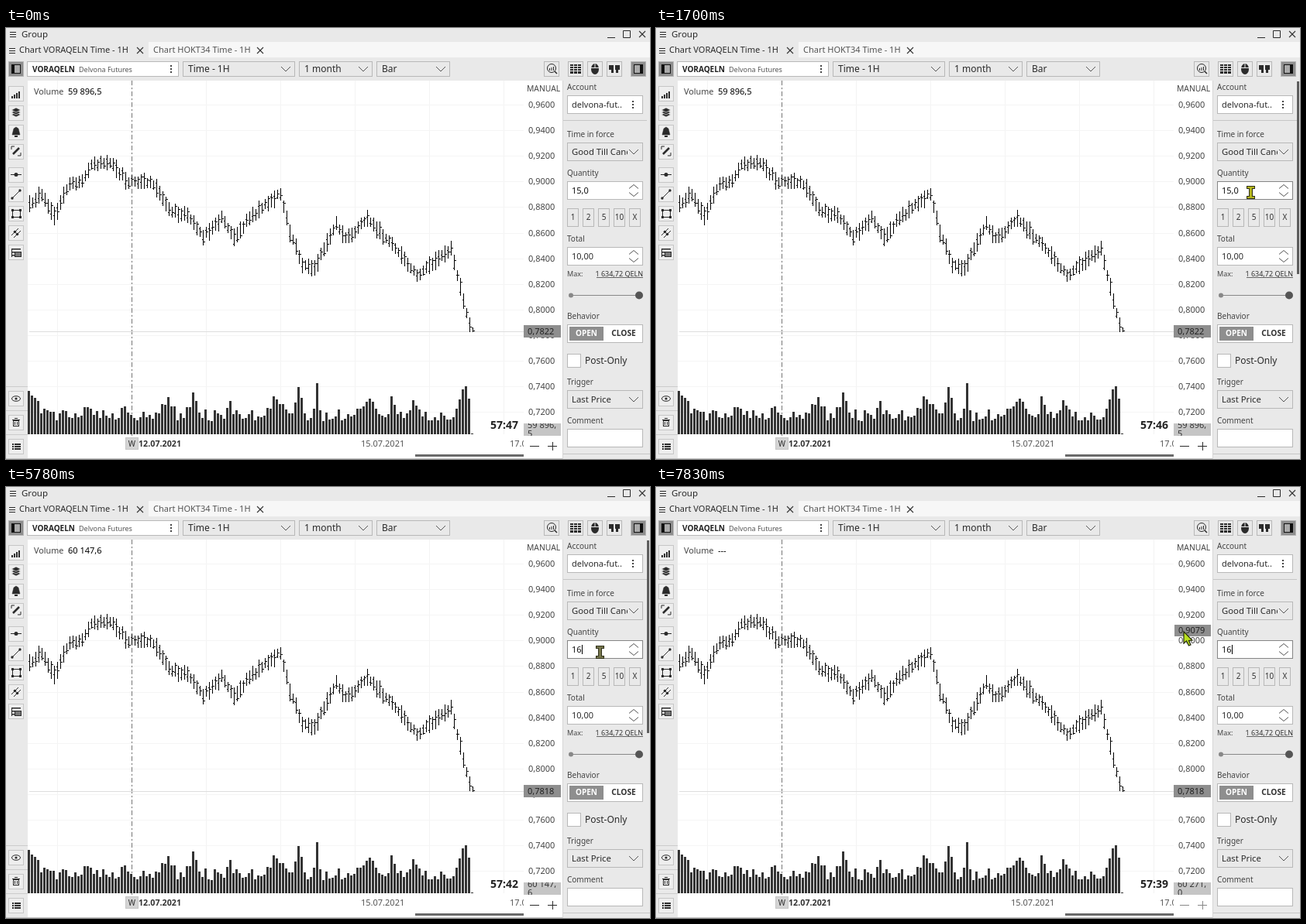
Recreate the animation shown at these times as an HTML page with a canvas. Size 831 px wide and 557 px high, loop 8 s.

```html
<!DOCTYPE html>
<html lang="en">
<head>
<meta charset="utf-8">
<title>Trading chart</title>
<style>
html, body { margin: 0; width: 100%; height: 100%; overflow: hidden; background: #e9e9e9; }
canvas { display: block; width: 831px; height: 557px; }
</style>
</head>
<body>
<canvas id="stage" width="831" height="557"></canvas>
<script>
const LOOP = 8000;
const c = document.getElementById('stage').getContext('2d');
const PANEL = '#e9e9e9', EDGE = '#b8b8b8', INK = '#2b2b2b', MID = '#8e8e8e';
const FONT = '"Noto Sans", "Open Sans", sans-serif';

// Drawing helpers
function rect(x, y, w, h, color = INK) {
  c.fillStyle = color;
  c.fillRect(x, y, w, h);
}
function box(x, y, w, h, fill, edge = EDGE) {
  rect(x, y, w, h, edge);
  rect(x + 1, y + 1, w - 2, h - 2, fill);
}
function text(s, x, y, size = 11, color = INK, weight = 400, align = 'left') {
  c.font = `${weight} ${size}px ${FONT}`;
  c.fillStyle = color;
  c.textAlign = align;
  c.fillText(s, x, y);
}
function path(points, color = INK, width = 1, fill) {
  c.beginPath();
  points.forEach(([x, y]) => c.lineTo(x, y));
  if (fill) {
    c.closePath();
    c.fillStyle = fill;
    c.fill();
  }
  c.strokeStyle = color;
  c.lineWidth = width;
  c.stroke();
}
function oval(x, y, rx, ry = rx, fill = INK) {
  c.beginPath();
  c.ellipse(x, y, rx, ry, 0, 0, 7);
  if (fill) {
    c.fillStyle = fill;
    c.fill();
  } else {
    c.strokeStyle = INK;
    c.lineWidth = 1;
    c.stroke();
  }
}
function clipped(x, y, w, h, draw) {
  c.save();
  c.beginPath();
  c.rect(x, y, w, h);
  c.clip();
  draw();
  c.restore();
}
function repeat(n, draw) {
  for (let i = 0; i < n; i++) draw(i);
}
const chevron = (x, y, d) => path([[x - 6, y - d], [x, y + d], [x + 6, y - d]], '#555');
const cross = (x, y) => {
  path([[x - 4, y - 4], [x + 4, y + 4]], '#333', 1.1);
  path([[x - 4, y + 4], [x + 4, y - 4]], '#333', 1.1);
};
const burger = (x, y) => repeat(3, i => rect(x, y - 3 + i * 3, 8, 1));
const dots = (x, y) => repeat(3, i => rect(x - 1, y - 5 + i * 4, 2, 2, '#444'));

function rng(seed) {
  return () => (seed = seed * 16807 % 2147483647) / 2147483647;
}

// Turning points of the price line: x, y
const turns = [[30, 229], [46, 214], [62, 243], [82, 201], [98, 199], [110, 177], [134, 174],
  [158, 199], [186, 198], [214, 238], [234, 240], [254, 271], [278, 246], [294, 272],
  [312, 247], [354, 214], [366, 264], [382, 305], [398, 310], [426, 254], [440, 273],
  [466, 246], [498, 281], [530, 320], [574, 286], [598, 386]];
// Busy spells: x, extra volume, spread
const busy = [[30, 35, 14], [106, 16, 8], [154, 18, 6], [208, 22, 8], [242, 34, 6],
  [290, 30, 4], [350, 34, 8], [378, 40, 5], [402, 45, 3], [470, 30, 10], [500, 26, 5],
  [528, 26, 5], [592, 48, 7]];

function along(points, x) {
  const i = Math.max(1, points.findIndex(p => p[0] >= x));
  const a = points[i - 1], b = points[i], u = (x - a[0]) / (b[0] - a[0]);
  return a.slice(1).map((v, k) => v + (b[k + 1] - v) * u);
}

function makeBars() {
  const rand = rng(4127), bars = [];
  for (let x = 30; x <= 598; x += 4) {
    const mid = along(turns, x)[0] + (rand() - .5) * 5;
    const half = 6 + 6 * rand();
    const spot = () => Math.round(mid + (rand() - .5) * half * 1.4);
    const extra = busy.reduce((m, [at, h, w]) =>
      Math.max(m, h * Math.exp(-(((x - at) / w) ** 2))), 0);
    bars.push({
      x, hi: Math.round(mid - half), lo: Math.round(mid + half),
      open: spot(), close: spot(),
      vol: Math.round(17 + 15 * rand() + extra * .8)
    });
  }
  return bars;
}
const bars = makeBars();

// Timeline
const clock = t => 47 - Math.floor(t / 970);
const price = t => t < 3910 ? '0,7822' : t < 4430 ? '0,7819' : '0,7818';
const volume = t => t < 3910 ? '59 896,5' : t < 7230 ? '60 147,6' : '60 271,0';
const quantity = t => t < 3960 ? '15,0' : t < 4700 ? '1' : '16';
function caretOn(t) {
  const since = [7430, 4700, 3960].find(at => t >= at);
  return since && Math.floor((t - since) / 540) % 2 === 0;
}

// Pointer: time, x, y
const track = [[660, 822, 524], [1140, 749, 247], [1700, 767, 212], [7440, 766, 213],
  [7830, 681, 187], [LOOP, 681, 187]];
function pointer(t) {
  if (t < track[0][0]) return null;
  const [x, y] = along(track, t);
  return { x, y };
}
const over = (p, y) => p && p.x >= 724 && p.x < 822 && p.y >= y && p.y < y + 25;

function header() {
  rect(0, 0, 831, 557, PANEL);
  rect(184, 18, 647, 20, '#f7f7f7');
  burger(5, 8);
  text('Group', 20, 12, 11.5);
  rect(776, 12, 10, 1);
  path([[796.5, 3.5], [805.5, 3.5], [805.5, 12.5], [796.5, 12.5]], INK, 1, PANEL);
  cross(821, 8);
  burger(4, 29);
  text('Chart VORAQELN Time - 1H', 17, 32);
  cross(173, 29);
  text('Chart HOKT34 Time - 1H', 190, 32, 11, '#555');
  cross(328, 29);

  box(27, 43, 196, 20, '#fff');
  text('VORAQELN', 34, 57, 10, '#222', 700);
  text('Delvona Futures', 94, 57, 9, '#555');
  dots(213, 53);
  [[228, 145, 'Time - 1H'], [378, 95, '1 month'], [478, 95, 'Bar']].forEach(([x, w, s]) => {
    box(x, 43, w, 20, PANEL);
    text(s, x + 7, 57, 12);
    chevron(x + w - 12, 53, 3);
  });

  [3, 694, 725, 750, 775, 806].forEach(x => box(x, 43, 20, 20, x === 3 || x === 806 ? MID : PANEL));
  [[7, 0], [810, 8]].forEach(([x, side]) => {
    box(x, 47, 12, 12, '#aaa', '#111');
    rect(x + side, 47, 4, 12, '#111');
  });
  oval(704, 52, 5.5, 5.5, null);
  repeat(3, i => rect(701 + i * 2.5, 52 - i, 1, 3 + i));
  path([[708, 56], [711, 59]], INK, 1.5);
  rect(728, 47, 14, 12);
  repeat(3, i => rect(728, 49 + i * 3, 14, 1, PANEL));
  repeat(2, i => rect(732 + i * 5, 47, 1, 12, PANEL));
  oval(760, 53, 5, 7);
  rect(755, 51, 10, 1, PANEL);
  rect(759.5, 46, 1, 5, PANEL);
  repeat(2, i => {
    rect(778 + i * 8, 48, 6, 6);
    rect(781 + i * 6, 54, 3, 4);
  });
}

function tools() {
  const button = y => box(3, y, 20, 20, '#eeeeee', '#c6c6c6');
  repeat(4, i => button(75 + i * 25));
  repeat(5, i => button(180 + i * 25));
  repeat(3, i => {
    button(469 + i * 31);
    rect(0, 463 + i * 31, 28, 1, '#cccccc');
  });
  // Bars, layers, bell, pencil
  repeat(4, i => rect(7 + i * 3, 88 - i * 2, 2, 3 + i * 2));
  repeat(3, i => {
    const y = 112 - i * 3;
    path([[7, y], [13, y - 3], [19, y], [13, y + 3]], '#eee', .7, INK);
  });
  path([[8, 138], [10, 130], [13, 128], [16, 130], [18, 138]], INK, .5, INK);
  rect(11, 139, 4, 2);
  path([[9, 163], [17, 155]], INK, 2.5);
  path([[7, 157], [7, 153], [11, 153]]);
  path([[19, 161], [19, 165], [15, 165]]);
  // Level, line, rectangle, channel, notes
  rect(6, 189, 14, 1);
  oval(13, 189.5, 2.5);
  path([[8, 220], [18, 210]]);
  [-5, 5].forEach(d => oval(13 + d, 215 - d, 1.7));
  box(8, 235, 11, 10, '#eee', INK);
  [8, 18].forEach(x => [235, 244].forEach(y => rect(x - 1, y - 1, 3, 3)));
  [0, 3].forEach(d => {
    path([[7 + d, 268 + d], [16 + d, 259 + d]]);
    oval(11.5 + d, 263.5 + d, 1.8);
  });
  repeat(3, i => rect(7, 285 + i * 4, 12, 1.5));
  rect(7, 285, 1, 11);
  box(11, 289, 9, 7, '#777', INK);
  // Eye, bin, list
  oval(13, 479, 5.5, 3.3, null);
  oval(13, 479, 1.6);
  box(9, 507, 8, 8, '#eee', INK);
  rect(8, 506, 10, 1);
  rect(11, 504, 4, 1);
  repeat(2, i => rect(11 + i * 3, 509, 1, 4));
  repeat(3, i => {
    rect(8, 537 + i * 3, 2, 2);
    rect(11, 537 + i * 3, 8, 2);
  });
}

function bar(x, hi, lo, open, close) {
  rect(x, hi, 1, lo - hi, '#000');
  rect(x - 1, open, 1, 1, '#000');
  rect(x + 1, close, 2, 1, '#000');
}

function chart(t) {
  rect(28, 68, 690, 488, '#fff');
  repeat(7, i => rect(66 + i * 96, 68, 1, 457, '#f3f3f3'));
  repeat(13, i => {
    const y = Math.round(99 + i * 33.1);
    rect(28, y, 640, 1, '#f5f5f5');
    text('0,' + (9600 - i * 200), 674, y + 4, 11, '#444');
  });
  c.setLineDash([6, 3, 2, 3]);
  path([[162.5, 68], [162.5, 528]], '#777');
  c.setLineDash([]);

  const py = t < 3910 ? 392 : 393;
  rect(30, py, 638, 1, '#dedede');
  for (const b of bars) {
    bar(b.x, b.hi, b.lo, b.open, b.close);
    rect(b.x - 2, 525 - b.vol, 3, b.vol, '#333');
  }
  bar(602, 387, py + 1, 387, py - 1);
  rect(600, 524, 3, 1, '#333');

  const outside = t >= 7640;
  text('MANUAL', 672, 82, 10.3, '#444');
  text('Volume', 36, 86, 10.8, '#444');
  text(outside ? '---' : volume(t), 80, 86, 11, '#000');
  text('57:' + clock(t), 625, 518, 14, '#222', 700);

  rect(668, py - 8, 48, 16, MID);
  text(price(t), 673, py + 4, 11, '#222');
  clipped(668, 511, 48, 16, () => {
    const v = volume(t);
    rect(668, 511, 48, 16, '#c5c5c5');
    text(v.slice(0, -1), 673, 517, 11, '#333');
    text(v.slice(-1), 673, 528, 11, '#333');
  });
  if (outside) {
    const y = Math.round(pointer(t).y) - 2;
    rect(669, y - 7, 47, 15, MID);
    text('0,9079', 674, y + 4, 11, '#222');
  }

  box(154, 529, 17, 16, '#d4d4d4', '#c6c6c6');
  text('W', 162.5, 541, 10, INK, 400, 'center');
  text('12.07.2021', 171, 541, 10.7, '#333', 700);
  text('15.07.2021', 458, 541, 11, '#555');
  clipped(640, 530, 28, 16, () => text('17.07.2021', 650, 541, 11, '#555'));
  const zoom = outside ? '#888' : INK;
  rect(676, 540, 12, 1, zoom);
  rect(699, 540, 12, 1, zoom);
  rect(705, 535, 1, 11, zoom);
  rect(528, 551, 140, 3, '#6a6a6a');
  rect(0, 556, 718, 1, '#c4c4c4');
}

function field(y, s, hot) {
  box(724, y, 98, 24, '#fff', hot ? '#858585' : EDGE);
  text(s, 730, y + 16);
}
function spinner(y) {
  chevron(810, y + 7, -2.5);
  chevron(810, y + 17, 2.5);
}
function combo(y, s) {
  box(724, y, 98, 24, PANEL);
  clipped(726, y + 1, 76, 22, () => text(s, 730, y + 16, 11.3));
  chevron(810, y + 12, 3);
}

function panel(t) {
  rect(718, 68, 1, 489, '#d6d6d6');
  [['Account', 80], ['Time in force', 141], ['Quantity', 191], ['Total', 276],
    ['Behavior', 376], ['Trigger', 461], ['Comment', 511]]
    .forEach(([s, y]) => text(s, 724, y, 10, '#444'));
  const was = pointer(t - 70);
  field(87, 'delvona-fut..');
  dots(809, 99);
  rect(719, 119, 108, 1, '#c6c6c6');
  combo(148, 'Good Till Canceled');

  field(198, '', t >= 1840 || over(was, 198));
  const q = quantity(t), picked = t >= 1900 && t < 3960;
  const w = c.measureText(q).width;
  if (picked) rect(729, 204, w + 1.5, 13, '#2f86e0');
  text(q, 730, 214, 11, picked ? '#fff' : '#111');
  if (caretOn(t)) rect(Math.round(730 + w), 204, 1, 12, '#000');
  spinner(198);

  ['1', '2', '5', '10', 'X'].forEach((s, i) => {
    box(724 + i * 20, 233, 15, 24, PANEL);
    text(s, 731.5 + i * 20, 248, 10, '#333', 400, 'center');
  });
  field(283, '10,00', over(was, 283));
  spinner(283);
  text('Max:', 724, 321, 9, '#444');
  text('1 634,72 QELN', 822, 321, 9, '#333', 400, 'right');
  rect(762, 322, 60, 1, '#666');
  rect(729, 345, 88, 1, '#888');
  oval(729, 345.5, 3, 3, '#888');
  oval(817, 345.5, 5, 5, '#555');

  field(383, '');
  rect(727, 386, 44, 18, MID);
  text('OPEN', 749, 398, 10, '#fff', 700, 'center');
  text('CLOSE', 797, 398, 10.2, '#333', 700, 'center');
  box(724, 421, 18, 18, '#fff');
  text('Post-Only', 747, 434, 12);
  combo(468, 'Last Price');
  field(518, '', over(was, 518));
  rect(719, 550, 112, 1, '#c6c6c6');
  if (t >= 700 && t < 7760) rect(827, 69, 3, 249, '#5c5c5c');
}

function cursor(t) {
  const p = pointer(t);
  if (!p) return;
  const x = Math.round(p.x), y = Math.round(p.y);
  const beam = (grow, color) => {
    rect(x - 4 - grow, y - 7 - grow, 9 + 2 * grow, 2 + 2 * grow, color);
    rect(x - 4 - grow, y + 6 - grow, 9 + 2 * grow, 2 + 2 * grow, color);
    rect(x - 1 - grow, y - 7, 3 + 2 * grow, 14, color);
  };
  if ([198, 283, 518].some(top => over(p, top))) {
    beam(1, '#30301a');
    beam(0, t > 1970 && t < 7180 ? '#77774d' : '#b3b51c');
  } else {
    const shape = [[0, 0], [0, 15], [3.5, 12], [6.5, 18], [9, 17], [6.5, 11.5], [11, 11]];
    path(shape.map(([dx, dy]) => [x + dx, y + dy]), '#23280c', 1.2, '#b9e01e');
  }
}

const start = performance.now();
function tick() {
  const t = (performance.now() - start) % LOOP;
  header();
  tools();
  chart(t);
  panel(t);
  cursor(t);
  requestAnimationFrame(tick);
}
tick();
</script>
</body>
</html>
```
